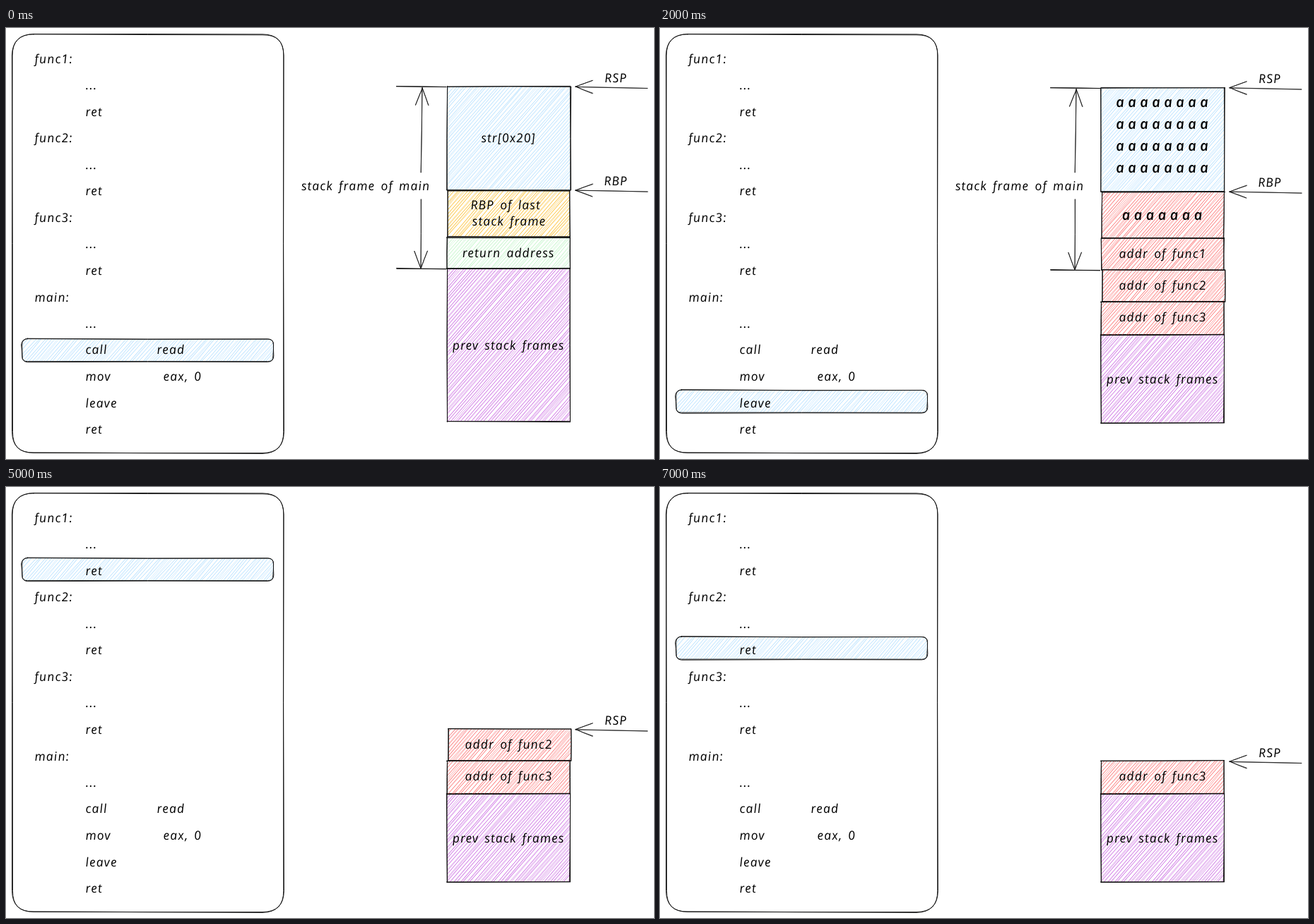
These frames come from a looping animation (917 px wide and 611 px high, 8 s). An HTML page with a canvas:

```html
<!DOCTYPE html>
<html lang="en">
<head>
<meta charset="utf-8">
<title>Return-oriented stack walk</title>
<style>
  html, body { margin: 0; width: 100%; height: 100%; overflow: hidden; background: #fff; }
  canvas { display: block; width: 917px; height: 611px; }
</style>
</head>
<body>
<canvas id="stage" width="917" height="611"></canvas>
<script>
const ctx = document.getElementById('stage').getContext('2d');
const INK = '#111';
const BLUE = '#a5d8ff', YELLOW = '#fab005', GREEN = '#b2f2bb', RED = '#fa5252', PURPLE = '#be4bdb';
const STEP_MS = 1000;
const HIGHLIGHT_TOPS = [441, 479, 513.5, 551, 65, 101, 178, 212.5];

let seed = 1;
function random() {
  seed = (seed * 16807) % 2147483647;
  return seed / 2147483647;
}
const jitter = amount => (random() * 2 - 1) * amount;
const reseed = value => { seed = Math.round(value * 7919) + 17; };

// Two slightly bowed passes give the hand-drawn look.
function sketchLine(x1, y1, x2, y2, wobble = 0.7, width = 0.95) {
  ctx.strokeStyle = INK;
  ctx.lineWidth = width;
  for (let pass = 0; pass < 2; pass++) {
    ctx.beginPath();
    ctx.moveTo(x1 + jitter(wobble), y1 + jitter(wobble));
    ctx.quadraticCurveTo(
      (x1 + x2) / 2 + jitter(wobble), (y1 + y2) / 2 + jitter(wobble),
      x2 + jitter(wobble), y2 + jitter(wobble));
    ctx.stroke();
  }
}

function hatch(x, y, w, h, color) {
  const pitch = 4.72, run = h / Math.tan(49 * Math.PI / 180);
  ctx.strokeStyle = color;
  ctx.lineWidth = 0.5;
  for (let start = x - run; start < x + w; start += pitch) {
    for (let pass = 0; pass < 2; pass++) {
      ctx.beginPath();
      ctx.moveTo(start + jitter(1.8), y + h);
      ctx.lineTo(start + run + jitter(1.8), y);
      ctx.stroke();
    }
  }
}

function sketchRect(x1, y1, x2, y2, color) {
  reseed(y1 + y2);
  ctx.save();
  ctx.beginPath();
  ctx.rect(x1, y1, x2 - x1, y2 - y1);
  ctx.clip();
  hatch(x1, y1, x2 - x1, y2 - y1, color);
  ctx.restore();
  sketchLine(x1, y1, x2, y1);
  sketchLine(x2, y1, x2, y2);
  sketchLine(x2, y2, x1, y2);
  sketchLine(x1, y2, x1, y1);
}

function roundPath(x1, y1, x2, y2, r, wobble) {
  const j = () => jitter(wobble);
  const startY = y1 + j();
  ctx.beginPath();
  ctx.moveTo(x1 + r, startY);
  ctx.quadraticCurveTo((x1 + x2) / 2, y1 + j(), x2 - r, y1 + j());
  ctx.quadraticCurveTo(x2, y1, x2 + j(), y1 + r);
  ctx.quadraticCurveTo(x2 + j(), (y1 + y2) / 2, x2 + j(), y2 - r);
  ctx.quadraticCurveTo(x2, y2, x2 - r, y2 + j());
  ctx.quadraticCurveTo((x1 + x2) / 2, y2 + j(), x1 + r, y2 + j());
  ctx.quadraticCurveTo(x1, y2, x1 + j(), y2 - r);
  ctx.quadraticCurveTo(x1 + j(), (y1 + y2) / 2, x1 + j(), y1 + r);
  ctx.quadraticCurveTo(x1, y1, x1 + r, startY);
  ctx.closePath();
}

function sketchRound(x1, y1, x2, y2, r, color) {
  reseed(x1 + y2 - y1);
  if (color) {
    ctx.save();
    roundPath(x1, y1, x2, y2, r, 0);
    ctx.clip();
    hatch(x1, y1, x2 - x1, y2 - y1, color);
    ctx.restore();
  }
  ctx.strokeStyle = INK;
  ctx.lineWidth = 0.95;
  for (let pass = 0; pass < 2; pass++) {
    roundPath(x1, y1, x2, y2, r, 0.9);
    ctx.stroke();
  }
}

// Italic letterforms set nearly upright resemble handwriting.
function write(text, x, middle, { size = 17.5, spacing = 1.1, weight = 500, center = false } = {}) {
  ctx.save();
  ctx.font = `italic ${weight} ${size}px "Open Sans", "Noto Sans", sans-serif`;
  ctx.letterSpacing = spacing + 'px';
  ctx.wordSpacing = '2.5px';
  ctx.fillStyle = '#000';
  const left = center ? x - (ctx.measureText(text).width - spacing) / 2 : x;
  ctx.translate(left, middle + 5.5);
  ctx.transform(1, 0, 0.1, 1, 0, 0);
  ctx.fillText(text, 0, 0);
  ctx.restore();
}
const label = (text, x, y, style) => write(text, x, y, { center: true, ...style });

function arrowHead(x, y, dx, dy) {
  const length = 24, spread = 9;
  for (const side of [-1, 1]) {
    sketchLine(x, y, x - dx * length + dy * side * spread, y - dy * length + dx * side * spread, 0.5, 0.8);
  }
}

function register(name, y) {
  reseed(name.charCodeAt(1));
  sketchLine(908, y + 1.8, 806, y, 0.3, 0.75);
  arrowHead(806, y, -1, 0);
  label(name, 863, y - 12.5);
}

function drawCode(step) {
  sketchRound(9, 9, 393, 602.5, 30);
  const top = HIGHLIGHT_TOPS[step];
  sketchRound(22.5, top, 378.5, top + 32, 8, BLUE);

  for (let i = 0; i < 3; i++) {
    const y = i * 112.7;
    write(`func${i + 1}:`, 41, 44 + y);
    write('...', 113, 81.5 + y);
    write('ret', 113, 119 + y);
  }
  write('main:', 41, 382);
  write('...', 113, 419);
  write('call', 113, 456);
  write('read', 214, 456);
  write('mov', 113, 494);
  write('eax, 0', 223, 494);
  write('leave', 113, 532);
  write('ret', 113, 569);
}

function drawFrameSpan(top, bottom, withArrows) {
  reseed(31);
  sketchLine(552, top, 623, top, 0.9, 1);
  sketchLine(552, bottom, 623, bottom, 0.9, 1);
  label('stack frame of main', 509, withArrows ? 224 : 322);
  if (!withArrows) return;
  sketchLine(587.5, 205, 589, top + 2, 0.4, 0.8);
  arrowHead(589, top + 2, 0, -1);
  sketchLine(587.5, 243, 587, bottom - 1, 0.4, 0.8);
  arrowHead(587, bottom - 1, 0, 1);
}

function drawInitialStack() {
  sketchRect(624, 341, 798, 558, PURPLE);
  sketchRect(624, 297, 798, 341, GREEN);
  sketchRect(625, 230.5, 798, 296, YELLOW);
  sketchRect(624, 83, 799, 230, BLUE);
  label('str[0x20]', 711, 156);
  label('RBP of last', 707, 251);
  label('stack frame', 712, 274);
  label('return address', 711, 319);
  label('prev stack frames', 711, 450);
  drawFrameSpan(83, 341, true);
  register('RSP', 83.5);
  register('RBP', 230);
}

function drawSmashedStack(step) {
  const popped = step < 4 ? 0 : step < 6 ? 1 : 2;
  const edges = [298, 343, 388, 435];
  const lefts = [625, 626, 624];

  sketchRect(624, 435, 798, 560, PURPLE);
  label('prev stack frames', 711, 498);
  for (let i = popped; i < 3; i++) {
    sketchRect(lefts[i], edges[i], i === 1 ? 799.5 : 798, edges[i + 1], RED);
    label(`addr of func${i + 1}`, 711.5, 320.5 + i * 45);
  }

  if (step < 3) {
    const filler = { size: 20, spacing: 5.4, weight: 600 };
    sketchRect(625, 232.5, 798, 298, RED);
    sketchRect(624, 85, 799, 232, BLUE);
    for (let row = 0; row < 4; row++) label('a'.repeat(8), 711, 106 + row * 31.3, filler);
    label('a'.repeat(7), 711, 266.5, filler);
    drawFrameSpan(85, 343, true);
    register('RSP', 85);
    register('RBP', 232);
  } else {
    if (!popped) drawFrameSpan(297.5, 343, false);
    register('RSP', [298, 344, 389.5][popped]);
  }
}

function render(now) {
  const step = Math.floor(now / STEP_MS) % HIGHLIGHT_TOPS.length;
  ctx.fillStyle = '#fff';
  ctx.fillRect(0, 0, 917, 611);
  ctx.lineCap = 'round';
  drawCode(step);
  if (step === 0) drawInitialStack();
  else drawSmashedStack(step);
}

const startTime = performance.now();
function tick() {
  render(performance.now() - startTime);
  requestAnimationFrame(tick);
}
tick();
</script>
</body>
</html>
```
